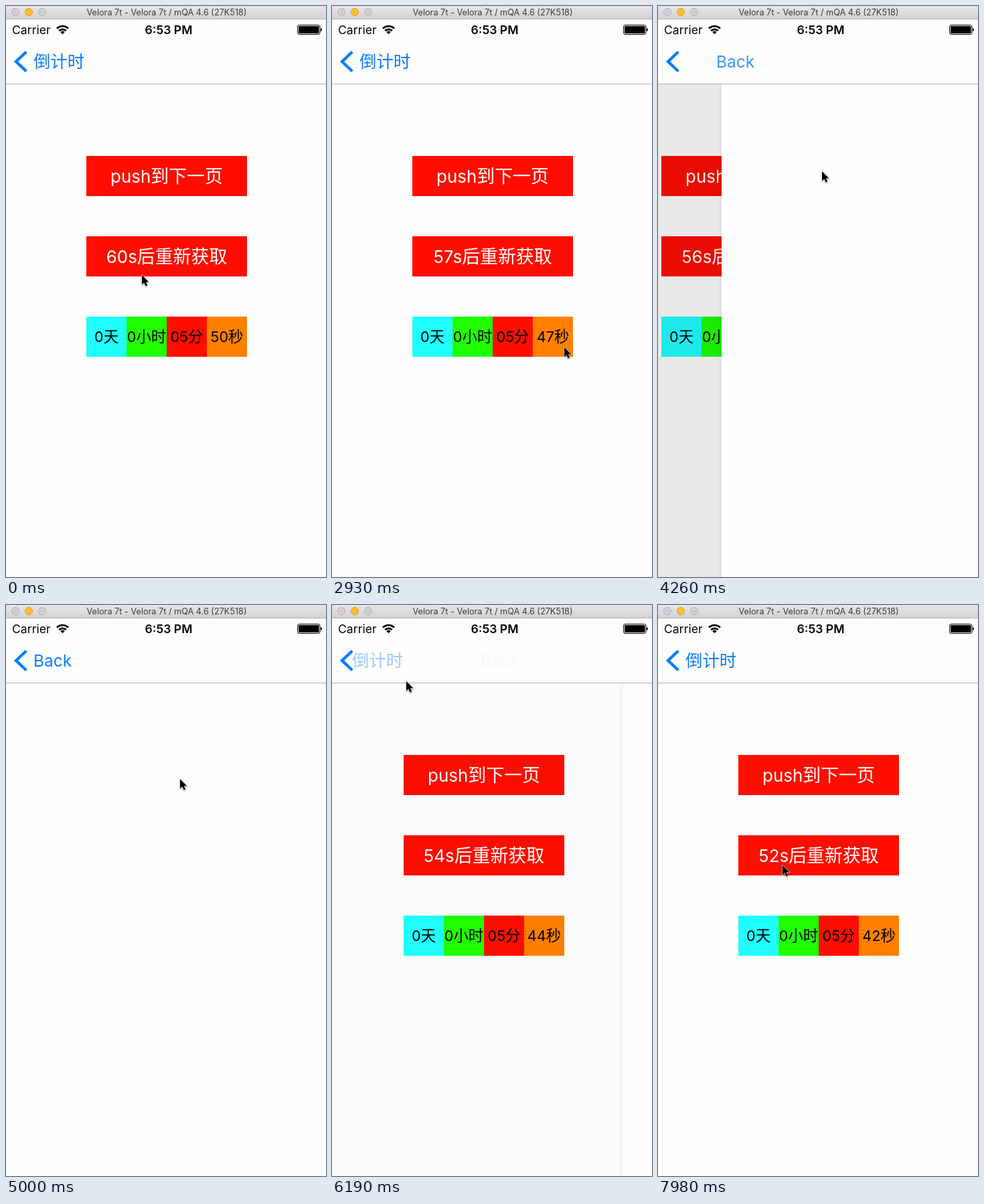
Write an HTML page that moves like this. It is 478x853 px and loops after 8 s.

```html
<!DOCTYPE html>
<html lang="zh-CN">
<head>
<meta charset="utf-8">
<title>Countdown</title>
<style>
html, body { margin: 0; width: 100%; height: 100%; overflow: hidden; background: #fefefe; }
svg { display: block; width: 478px; height: 853px; }
text { font-family: Inter, "Noto Sans CJK SC", "Noto Sans CJK JP", "Noto Sans CJK", sans-serif; }
.mid { text-anchor: middle; }
.latin { font-size: .965em; }
.button { font-size: 26.9px; fill: #fff; }
.cell { font-size: 22.4px; fill: #000; }
.nav { font-size: 25.4px; fill: #0a7cff; }
</style>
</head>
<body>
<svg viewBox="0 0 478 853">
  <defs>
    <linearGradient id="bar" x2="0" y2="1">
      <stop stop-color="#e8e6e8"/><stop offset="1" stop-color="#d2d0d2"/>
    </linearGradient>
    <linearGradient id="shade">
      <stop stop-color="#000" stop-opacity="0"/><stop offset="1" stop-color="#000" stop-opacity=".04"/>
    </linearGradient>
  </defs>
  <rect width="478" height="853" fill="#fefefe"/>

  <g id="home"></g>
  <rect id="dim" y="117" width="478" height="736"/>
  <g id="next">
    <rect x="-7" y="117" width="7" height="736" fill="url(#shade)"/>
    <rect y="117" width="478" height="736" fill="#fefefe"/>
  </g>

  <rect y="20" width="478" height="96" fill="#fefefe"/>
  <rect y="116" width="478" height="1" fill="#b2b2b2"/>
  <g id="back">
    <path d="M30.3 68.5 15 83 30.3 97.5" fill="none" stroke="#0a7cff" stroke-width="4.4"/>
    <text id="oldTitle" class="nav" y="92">倒计时</text>
    <text id="newTitle" class="nav" y="92"><tspan class="latin">Back</tspan></text>
  </g>

  <text x="9" y="42" font-size="17.6">Carrier</text>
  <text class="mid" x="243" y="42" font-size="17.6" font-weight="600">6:53 PM</text>
  <g fill="none" stroke="#000" stroke-width="2.7">
    <path d="M76 33.6a12.3 12.3 0 0 1 17 0M79.2 37a7.6 7.6 0 0 1 10.6 0"/>
    <path d="M81.3 38.9a4.6 4.6 0 0 1 6.4 0L84.5 42.3Z" fill="#000" stroke="none"/>
  </g>
  <rect x="435.5" y="28.5" width="33.5" height="14" rx="2.5" fill="none" stroke="#000"/>
  <rect x="437" y="30" width="30.5" height="11" rx="1"/>
  <path d="M470 33q2 .6 2 2.5t-2 2.5z"/>

  <rect width="478" height="20" fill="url(#bar)"/>
  <rect y="19" width="478" height="1" fill="#b4b2b4"/>
  <g fill="#d3d1d3" stroke="#b3b1b3">
    <circle cx="14" cy="9" r="5.5"/><circle cx="54" cy="9" r="5.5"/>
    <circle cx="34" cy="9" r="5.5" fill="#fdbd2e" stroke="#dfa023"/>
    <path d="M12.5 9h3M52.5 9h3"/>
  </g>
  <text class="mid" x="240" y="14" font-size="12.7" fill="#3c3c3c">Velora 7t - Velora 7t / mQA 4.6 (27K518)</text>

  <path id="cursor" d="M0 0V14.2L3.3 11.2 5.6 16.4 8.2 15.3 6 10.2H10.4Z" stroke="#fff" stroke-width="1.1" paint-order="stroke" style="filter:drop-shadow(0 1px 1px #0006)"/>
</svg>
<script>
const LOOP = 8000, STEP = 147.3, WIDTH = 478;
const $ = id => document.getElementById(id);

const label = (latin, han, id) =>
  `<tspan class="latin"${id ? ` id="${id}"` : ''}>${latin}</tspan>${han}`;
const box = (x, y, w, fill, kind, content) =>
  `<rect x="${x}" y="${y}" width="${w}" height="60" fill="${fill}"/>` +
  `<text class="mid ${kind}" x="${x + w / 2}" y="${y + (kind === 'cell' ? 38 : 40)}">${content}</text>`;

$('home').innerHTML =
  box(120, 224, 240, '#ff0d00', 'button', label('push', '到下一页')) +
  box(120, 344, 240, '#ff0d00', 'button', label('60s', '后重新获取', 'resend')) +
  box(120, 464, 60, '#1fffff', 'cell', label('0', '天')) +
  box(180, 464, 60, '#1fff00', 'cell', label('0', '小时')) +
  box(240, 464, 60, '#ff0d00', 'cell', label('05', '分')) +
  box(300, 464, 60, '#ff8000', 'cell', label('50', '秒', 'seconds'));

// Pointer stops: time, x, y
const stops = [
  [0, 203, 402], [300, 203, 402], [730, 128, 412], [1300, 205, 395], [1907, 205, 395],
  [2650, 340, 516], [2938, 347, 510], [3110, 347, 510], [3850, 245, 247], [4264, 245, 247],
  [4700, 260, 260], [5200, 260, 260], [5740, 52, 84], [6020, 52, 84], [6179, 111, 114],
  [6326, 160, 270], [6500, 160, 270], [6940, 186, 389], [LOOP, 186, 389]
];

function pointerAt(t) {
  const i = Math.max(1, stops.findIndex(s => s[0] >= t));
  const [t0, x0, y0] = stops[i - 1], [t1, x1, y1] = stops[i];
  const u = (t - t0) / (t1 - t0), e = u * u * (3 - 2 * u);
  return [x0 + (x1 - x0) * e, y0 + (y1 - y0) * e];
}

// Critically damped spring from 0 to 1
function spring(ms, rate) {
  const a = Math.max(0, ms) / 1000 * rate;
  return 1 - (1 + a) * Math.exp(-a);
}

const ticks = (t, first) => Math.floor((t - first) / 1000) + 1;
const move = (id, x, y = 0) => $(id).setAttribute('transform', `translate(${x} ${y})`);

function draw(now) {
  const t = Math.max(0, Math.floor((now % LOOP + 24) / STEP) * STEP - 8);
  const popping = t > 5907;
  let p = popping ? 1 - spring(t - 5907, 14.8) : spring(t - 4100, 18.3);
  if (p < 0.003) p = 0;
  if (p > 0.997) p = 1;

  move('home', Math.round(-0.3 * WIDTH * p));
  move('next', Math.round(WIDTH * (1 - p)));
  $('next').setAttribute('visibility', p ? 'visible' : 'hidden');
  $('dim').setAttribute('opacity', 0.105 * p);

  move('oldTitle', 41 - 122 * p);
  $('oldTitle').setAttribute('opacity', Math.max(0, 1 - p * 6.67));
  move('newTitle', 41 + (popping ? 199 : 230) * (1 - p));
  $('newTitle').setAttribute('opacity', popping ? p * p * p + 0.04 * (p > 0) * (1 - p) : p);
  $('back').setAttribute('opacity', t > 5800 && !popping ? 0.3 : 1);

  $('resend').textContent = 60 - ticks(t, 550) + 's';
  $('seconds').textContent = 50 - ticks(t, 300);
  move('cursor', ...pointerAt(t).map(Math.round));
}

const start = performance.now();
function tick() {
  draw(performance.now() - start);
  requestAnimationFrame(tick);
}
tick();
</script>
</body>
</html>
```
